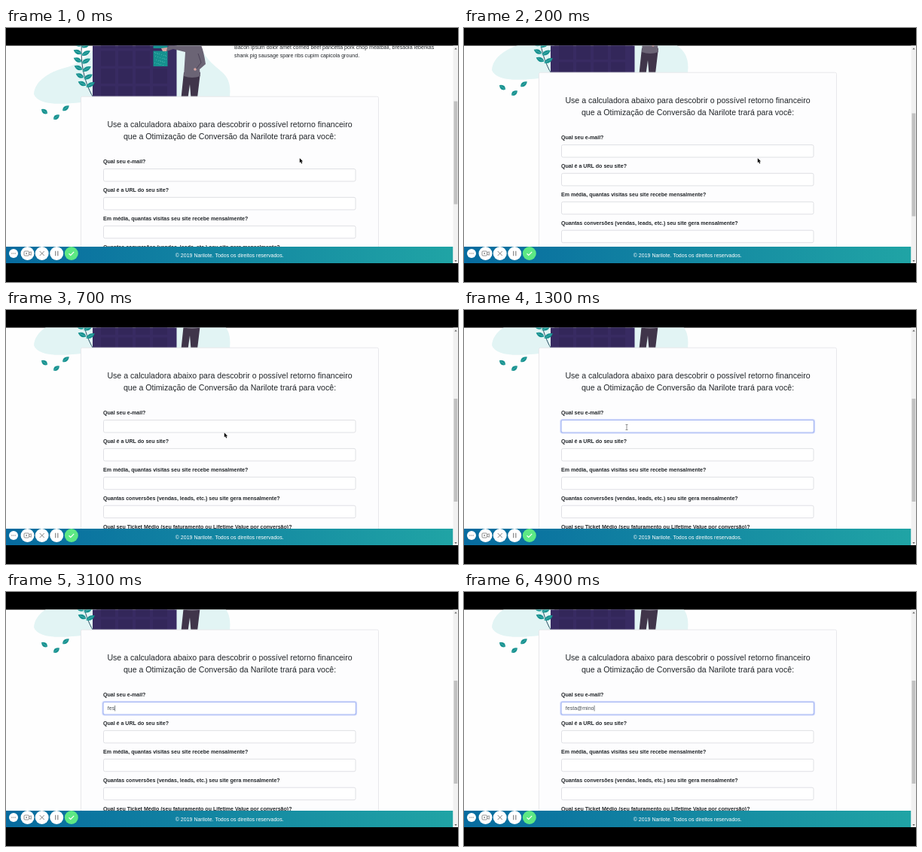
An HTML page with a canvas that plays this animation: 600x338 px, repeating every 5000 ms.

```html
<!DOCTYPE html>
<html lang="pt-BR">
<head>
<meta charset="utf-8">
<title>Calculadora</title>
<style>
  html, body { margin: 0; width: 100%; height: 100%; overflow: hidden; background: #000; }
  canvas { display: block; width: 600px; height: 338px; }
</style>
</head>
<body>
<canvas id="stage" width="600" height="338"></canvas>
<script>
const ctx = document.getElementById('stage').getContext('2d');
const LOOP = 5000, STEP = 100;
const FONT = '"Liberation Sans", Arial, sans-serif';
const INK = '#212529', TEAL = '#16918f', NAVY = '#382b62', PALE = '#e2f4f4';
const LABELS = [
  'Qual seu e-mail?',
  'Qual é a URL do seu site?',
  'Em média, quantas visitas seu site recebe mensalmente?',
  'Quantas conversões (vendas, leads, etc.) seu site gera mensalmente?',
  'Qual seu Ticket Médio (seu faturamento ou Lifetime Value por conversão)?'
];
const EMAIL = 'festa@mino';
const KEYS = [2300, 2500, 3100, 3500, 4000, 4300, 4600, 4700, 4900, 4900];

function rect(x, y, w, h, color) {
  ctx.fillStyle = color;
  ctx.fillRect(x, y, w, h);
}

function shape(d, color) {
  ctx.fillStyle = color;
  ctx.fill(new Path2D(d));
}

function line(d, color, width) {
  ctx.strokeStyle = color;
  ctx.lineWidth = width;
  ctx.stroke(new Path2D(d));
}

function disc(x, y, r, color) {
  ctx.fillStyle = color;
  ctx.beginPath();
  ctx.arc(x, y, r, 0, Math.PI * 2);
  ctx.fill();
}

function box(x, y, w, h, r, fill, stroke, width = 1) {
  ctx.beginPath();
  ctx.roundRect(x, y, w, h, r);
  ctx.fillStyle = fill;
  ctx.fill();
  ctx.strokeStyle = stroke;
  ctx.lineWidth = width;
  ctx.stroke();
}

function text(str, x, y, size, color = INK, align = 'left', weight = 'normal') {
  ctx.font = `${weight} ${size}px ${FONT}`;
  ctx.textAlign = align;
  ctx.fillStyle = color;
  ctx.fillText(str, x, y);
}

function leaf(x, y, angle, len, wide) {
  ctx.save();
  ctx.translate(x, y);
  ctx.rotate(angle);
  shape(`M0 0Q${len * .45} ${-wide} ${len} 0Q${len * .45} ${wide} 0 0Z`, TEAL);
  line(`M0 0L${len * .8} 0`, '#70c4c2', .5);
  ctx.restore();
}

// Drawn in page coordinates: the card starts at y = 50.
function drawArt() {
  shape('M116 -12C104 -2 96 8 78 12C56 18 38 30 37 47C42 60 64 62 100 58L120 58V-12Z', PALE);
  shape('M224 -30H255C260 -2 274 6 286 17C298 27 299 40 296 58H224Z', PALE);

  rect(115, -40, 111.5, 95, NAVY);
  for (let row = 0; row < 4; row++)
    for (let col = 0; col < 4; col++)
      rect(126 + col * 23, -34 + row * 23.5, 19, 20, '#33275a');
  rect(195.5, -34, 19, 20, TEAL);
  rect(195.5, -10.5, 19, 20.5, TEAL);
  ctx.fillStyle = '#4db5b0';
  for (let i = 0; i < 30; i++)
    ctx.fillRect(197 + (i * 7) % 16, -9 + (i * 11) % 18, 1, .8);

  line('M101 -25C98 0 102 28 116 52', '#2a5063', 1);
  for (let i = 0; i < 6; i++) {
    const y = -17 + i * 10.5;
    const x = 100.5 + Math.max(0, y) ** 2 / 210;
    leaf(x, y, Math.PI + .45, 12, 6);
    leaf(x, y + 2, -.5, 13, 6);
  }
  leaf(55, 73, -2.5, 10, 6);
  leaf(63, 80.5, -.65, 10, 6);
  leaf(75, 69, -.65, 11, 6);

  shape('M236 18L232.5 52H241.5L244 34L245.5 52H254L258 18Z', '#40354a');
  shape('M238 -22L219 -19L211 -13L213 -10L222 -13L238 -9L236 23Q247 27 258 23L257 14L265 7Q262 -14 257 -22Z', '#6b6475');
  shape('M206 -14L214 -15L213 -10L208 -10Z', '#d9a6a3');
  line('M255 -7L259 5L252 14', '#4b4256', 1);
  disc(251, 14, 1.8, '#d9a6a3');
}

function drawField(y, focused) {
  if (focused) {
    box(129, y, 335.5, 16.5, 2, '#fff', '#d9e0fc', 3.5);
    box(129, y, 335.5, 16.5, 2, '#fff', '#a3b5f3', 1.2);
  } else {
    box(129.5, y, 334.5, 16.5, 2, '#fff', '#dcdde1', .9);
  }
}

function drawPage(t, scroll) {
  ctx.save();
  ctx.translate(0, scroll);
  drawArt();
  text('Bacon ipsum dolor amet corned beef pancetta pork chop meatball, bresaola leberkas', 303, -12.8, 7.06);
  text('shank pig sausage spare ribs cupim capicola ground.', 303, -2.2, 7.06);

  box(99.5, 50.2, 395, 300, 2, '#fdfdfe', '#e8e8eb', 1);
  text('Use a calculadora abaixo para descobrir o possível retorno financeiro', 297, 91.3, 10.58, INK, 'center');
  text('que a Otimização de Conversão da Narilote trará para você:', 297, 107.2, 10.58, INK, 'center');
  LABELS.forEach((label, i) => {
    text(label, 129, 139.3 + i * 38, 7.06, INK, 'left', 'bold');
    drawField(146.5 + i * 37.9, i === 0 && t >= 1200);
  });

  const typed = EMAIL.slice(0, KEYS.filter(k => k <= t).length);
  text(typed, 134.8, 157, 7.06, '#495057');
  if (t >= 1700)
    rect(135 + ctx.measureText(typed).width, 151, .7, 7.5, '#495057');
  ctx.restore();
}

function drawFooter() {
  const fade = ctx.createLinearGradient(0, 0, 593.5, 0);
  fade.addColorStop(0, '#076b9f');
  fade.addColorStop(1, '#20a4a5');
  rect(0, 291, 593.5, 23, fade);
  text('© 2019 Narilote. Todos os direitos reservados.', 296.7, 304.8, 7.03, '#fff', 'center');
}

function drawControls() {
  disc(10, 300, 6, '#fff');
  [28.5, 47.7, 67.2].forEach(x => disc(x, 300, 9, '#fff'));
  disc(86.8, 300, 9, '#5de884');
  const gray = '#858585';
  line('M7 300H8.5M9.3 300H10.7M11.5 300H13', gray, 1);
  ctx.beginPath();
  ctx.roundRect(24, 297, 6.5, 6, 1);
  ctx.strokeStyle = gray;
  ctx.lineWidth = .9;
  ctx.stroke();
  line('M30.5 299.2L33.3 297.7V302.3L30.5 300.8', gray, .9);
  disc(27.2, 300, 1, gray);
  line('M44.7 297L50.7 303M50.7 297L44.7 303', gray, 1);
  line('M65.7 296.8V303.2M68.8 296.8V303.2', gray, 1.2);
  line('M83.5 300.2L85.8 302.4L90.2 297.8', '#fff', 1.2);
}

function drawScrollbar(scroll) {
  rect(593.5, 23, 6.5, 291, '#f1f1f1');
  rect(594.5, 118 - scroll * .5, 4.8, 137, '#c1c1c1');
  shape('M595.3 28.5L597 26.3L598.7 28.5Z', '#666');
  shape('M595.3 309L597 311.2L598.7 309Z', '#666');
}

function drawPointer(t) {
  if (t >= 2500) return;
  const u = Math.min(1, Math.max(0, (t - 210) / 890));
  const s = u * u * (3 - 2 * u);
  const x = 389.8 - 173.8 * s, y = 173.2 - 17.2 * s;
  ctx.save();
  ctx.translate(x, y);
  if (y < 163) {
    line('M-1.5 -3.5H1.5M0 -3.5V3.5M-1.5 3.5H1.5', '#777', .8);
  } else {
    const arrow = 'M0 0V6L1.4 4.8L2.4 7.2L3.5 6.7L2.5 4.4H4.3Z';
    line(arrow, '#fff', 1);
    shape(arrow, '#000');
  }
  ctx.restore();
}

function draw(t) {
  const scroll = Math.max(0, 41 - t * .16);
  rect(0, 0, 600, 338, '#000');
  ctx.save();
  ctx.beginPath();
  ctx.rect(0, 23.5, 600, 289.5);
  ctx.clip();
  rect(0, 23, 600, 291, '#fefefe');
  drawPage(t, scroll);
  drawFooter();
  drawControls();
  drawScrollbar(scroll);
  drawPointer(t);
  ctx.restore();
}

const start = performance.now();
function tick() {
  const t = (performance.now() - start) % LOOP;
  draw(Math.floor(t / STEP) * STEP);
  requestAnimationFrame(tick);
}
tick();
</script>
</body>
</html>
```
